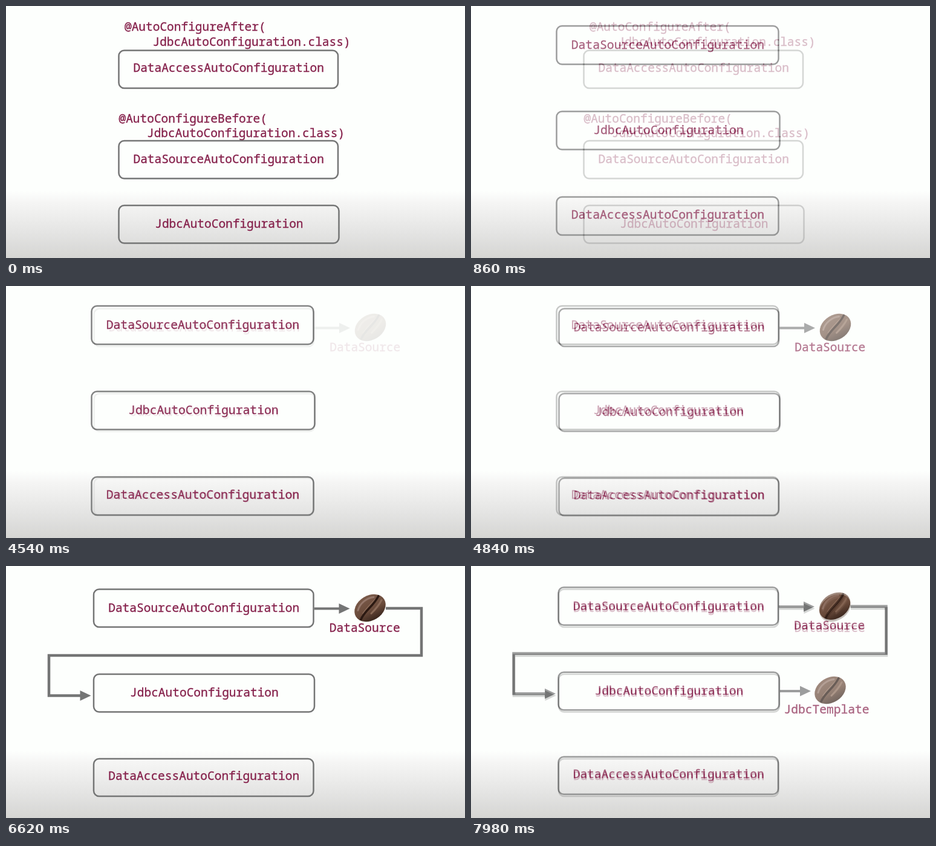
Animation, 759 px wide and 417 px high, one loop 8000 ms. Source, as an HTML page with a canvas:

```html
<!DOCTYPE html>
<html lang="en">
<head>
<meta charset="utf-8">
<title>Auto-configuration order</title>
<style>
  html, body { margin: 0; width: 100%; height: 100%; overflow: hidden; background: #fdfffd; }
  canvas { display: block; width: 759px; height: 417px; }
</style>
</head>
<body>
<canvas id="stage" width="759" height="417"></canvas>
<script>
const W = 759, H = 417, LOOP = 8000, STEP = 60, STEPS = 10;
const FADES = [500, 4540, 6080, 7620];
const INK = '#86224c', LINE = '#747575';
const SOURCE = 'DataSourceAutoConfiguration';
const JDBC = 'JdbcAutoConfiguration';
const ACCESS = 'DataAccessAutoConfiguration';

function background(c) {
  const g = c.createLinearGradient(0, 306, 0, H);
  g.addColorStop(0, '#fdfffd');
  g.addColorStop(0.18, '#f5f5f4');
  g.addColorStop(0.6, '#e5e5e4');
  g.addColorStop(1, '#d5d5d3');
  c.fillStyle = g;
  c.fillRect(0, 0, W, H);
}

// The advance of the monospaced face is 0.6 em; a hairline outline adds weight.
function text(c, str, x, y, advance, align = 'center') {
  c.font = `${advance / 0.6}px "Noto Sans Mono", monospace`;
  c.textAlign = align;
  c.fillStyle = c.strokeStyle = INK;
  c.lineWidth = 0.35;
  c.fillText(str, x, y);
  c.strokeText(str, x, y);
}

function box(c, x, y, w, h) {
  c.strokeStyle = LINE;
  c.lineWidth = 2.5;
  c.beginPath();
  c.roundRect(x, y, w, h, 9);
  c.stroke();
}

function labelBox(c, str, x, y, w, h, advance, baseline) {
  box(c, x, y, w, h);
  text(c, str, x + w / 2 + 0.4, y + baseline, advance);
}

// Polyline ending in a head that points right.
function arrow(c, points, width = 4) {
  const [tipX, tipY] = points[points.length - 1];
  c.strokeStyle = c.fillStyle = LINE;
  c.lineWidth = width;
  c.beginPath();
  points.forEach(([x, y], i) => c.lineTo(i === points.length - 1 ? x - 16 : x, y));
  c.stroke();
  c.beginPath();
  c.moveTo(tipX, tipY);
  c.lineTo(tipX - 18, tipY - 8.5);
  c.lineTo(tipX - 18, tipY + 8.5);
  c.fill();
}

function curve(c, color, width, [x0, y0, x1, y1, x2, y2, x3, y3]) {
  c.strokeStyle = color;
  c.lineWidth = width;
  c.beginPath();
  c.moveTo(x0, y0);
  c.bezierCurveTo(x1, y1, x2, y2, x3, y3);
  c.stroke();
}

function bean(c, x, y) {
  c.save();
  c.translate(x, y);
  c.lineCap = 'round';
  const g = c.createLinearGradient(-12, -20, 10, 23);
  g.addColorStop(0, '#7b5b4a');
  g.addColorStop(0.55, '#6a4b3b');
  g.addColorStop(1, '#2e1d16');
  c.fillStyle = g;
  c.beginPath();
  c.ellipse(0, 0, 27.5, 20.5, -0.55, 0, Math.PI * 2);
  c.fill();
  c.clip();
  curve(c, '#95776a', 3, [-20, 4, -17, -8, -5, -17, 6, -18]);
  curve(c, '#8a6a58', 3, [2, 9, 9, 2, 15, -5, 19, -13]);
  curve(c, '#8a6a58', 1.5, [-12, 9, -6, 0, 2, -8, 9, -15]);
  curve(c, '#2b1912', 3.5, [-15, 19, -9, 4, 5, -2, 14, -20]);
  c.restore();
}

function annotated(c) {
  const a = 11.69;
  text(c, '@AutoConfigureAfter(', 196, 41, a, 'left');
  text(c, JDBC + '.class)', 242.5, 65.5, a, 'left');
  labelBox(c, ACCESS, 186.5, 73.5, 362.5, 62.5, a, 35.5);
  text(c, '@AutoConfigureBefore(', 186.5, 192.5, a, 'left');
  text(c, JDBC + '.class)', 233, 217, a, 'left');
  labelBox(c, SOURCE, 186.5, 223, 362.5, 62.5, a, 37);
  labelBox(c, JDBC, 186.5, 330, 364, 62.5, a, 37);
}

function ordered(c) {
  const a = 11.84;
  labelBox(c, SOURCE, 141.5, 33, 367, 63.5, a, 37.5);
  labelBox(c, JDBC, 141.5, 174.5, 369, 63, a, 37.5);
  labelBox(c, ACCESS, 141.5, 316, 367, 63, a, 36);
}

function withSource(c) {
  const a = 11.71;
  labelBox(c, SOURCE, 145.5, 37.5, 363.5, 62.5, a, 37.5);
  labelBox(c, JDBC, 145.5, 178, 365, 62.5, a, 37);
  labelBox(c, ACCESS, 145.5, 318, 363.5, 62, a, 35);
  arrow(c, [[510, 69.5], [569, 69.5]]);
  bean(c, 602.5, 68.5);
  text(c, 'DataSource', 593.8, 107.5, a);
}

function injected(c) {
  c.save();
  c.translate(-0.5, 1);
  withSource(c);
  arrow(c, [[628.5, 69], [687.5, 69], [687.5, 147], [71.5, 147], [71.5, 213.5], [141, 213.5]], 4.5);
  c.restore();
}

function withTemplate(c) {
  c.save();
  c.translate(-0.5, -3.2);
  injected(c);
  c.restore();
  arrow(c, [[511, 207], [562, 207]]);
  bean(c, 594, 205.5);
  text(c, 'JdbcTemplate', 588, 243.5, 11.75);
}

function render(draw) {
  const layer = document.createElement('canvas');
  layer.width = W;
  layer.height = H;
  const c = layer.getContext('2d');
  background(c);
  draw(c);
  return layer;
}

const slides = [annotated, ordered, withSource, injected, withTemplate].map(render);
const stage = document.getElementById('stage').getContext('2d');
const start = performance.now();

function frame() {
  const t = (performance.now() - start) % LOOP;
  const index = FADES.filter(begin => t >= begin).length;
  stage.globalAlpha = 1;
  stage.drawImage(slides[Math.max(0, index - 1)], 0, 0);
  if (index > 0) {
    const step = Math.floor((t - FADES[index - 1]) / STEP) + 1;
    stage.globalAlpha = Math.min(1, step / STEPS);
    stage.drawImage(slides[index], 0, 0);
  }
  requestAnimationFrame(frame);
}
frame();
</script>
</body>
</html>
```
